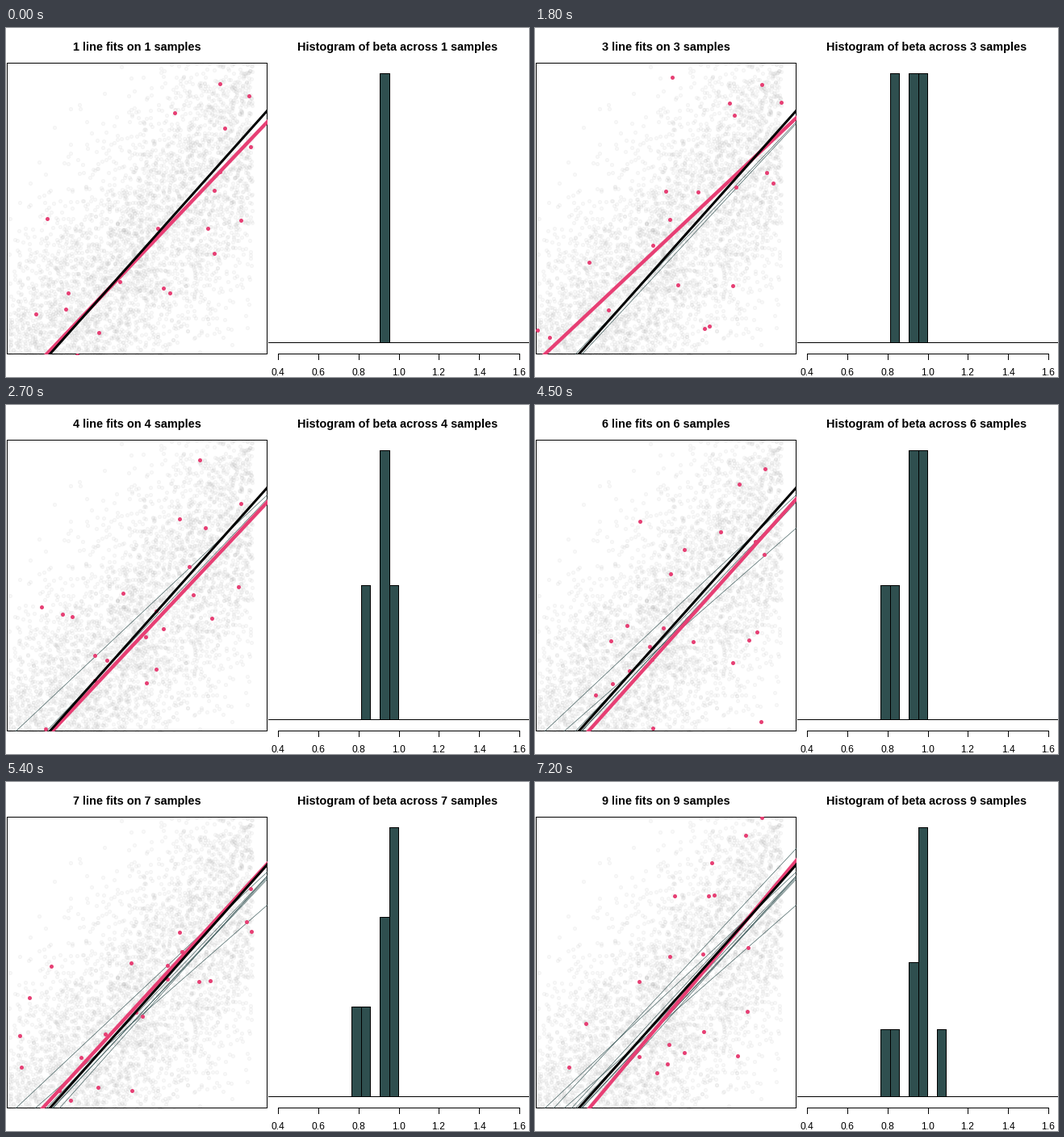
Recreate the animation shown at these times as a matplotlib script. Size 648 by 432 pixels, loop 8000 ms.

```python
import numpy as np
import matplotlib.pyplot as plt
from matplotlib.animation import FuncAnimation
from matplotlib.patches import Rectangle

W, H, DPI = 648, 432, 72
LEFT, RIGHT, TOP, BOTTOM = 1, 323, 43, 403
BASE, PEAK = 389, 56
AXIS_X, AXIS_MIN, UNIT = 337, 0.4, 249.2
BIN_START, BIN_WIDTH, BIN_COUNT = 0.766, 0.0466, 7
PINK, SLATE = "#E73F74", "#2F4F4F"
STEP, FRAMES, INTERVAL = 9, 80, 100

# Each fit: x where it meets the panel's bottom, y where it meets the right side
TRUE_FIT = (54, 102)
FITS = [(50, 116), (58, 118), (12, 111), (57, 120), (36, 152),
        (66, 116), (45, 101), (23, 82), (67, 97)]


def slope(fit):
    x0, y1 = fit
    return (BOTTOM - y1) / (RIGHT - x0)


def line_y(fit, x):
    return BOTTOM - (x - fit[0]) * slope(fit)


def beta_px(beta):
    return AXIS_X + UNIT * (beta - AXIS_MIN)


fig = plt.figure(figsize=(W / DPI, H / DPI), dpi=DPI, facecolor="white")
ax = fig.add_axes([0, 0, 1, 1])
ax.set_xlim(0, W)
ax.set_ylim(H, 0)
ax.axis("off")
panel = Rectangle((LEFT, TOP), RIGHT - LEFT + 1, BOTTOM - TOP + 1,
                  transform=ax.transData)


def stroke(xs, ys, z=2):
    ax.plot(xs, ys, color="black", lw=1, zorder=z, antialiased=False,
            solid_capstyle="butt")


def fit_line(fit, color, lw, z):
    xs = np.array([LEFT - 10, RIGHT + 10])
    line, = ax.plot(xs + 0.5, line_y(fit, xs) + 0.5, color=color, lw=lw, zorder=z)
    line.set_clip_path(panel)
    return line


def markers(xs, ys, **style):
    points, = ax.plot(xs, ys, "o", **style)
    points.set_clip_path(panel)
    return points


def label(x, y, text, size, weight="normal"):
    return ax.text(x, y, text, family="Liberation Sans", size=size,
                   weight=weight, ha="center", va="baseline")


# Population cloud, and one random sample of it for each fit
rng = np.random.default_rng(5)
cloud_x = rng.uniform(3, 305, 5000)
cloud_y = line_y(TRUE_FIT, cloud_x) + rng.normal(0, 88, cloud_x.size)
cloud = np.round(np.column_stack([cloud_x, cloud_y]))
samples = [rng.choice(cloud, 26, replace=False) for _ in FITS]

markers(*cloud.T, ms=4, mew=1, mfc=(0.745, 0.745, 0.745, 0.08),
        mec=(0.745, 0.745, 0.745, 0.15), zorder=1)
stroke([LEFT, RIGHT, RIGHT, LEFT, LEFT], [TOP, TOP, BOTTOM, BOTTOM, TOP])

thin = [fit_line(f, SLATE, 0.6, 3) for f in FITS]
dots = markers([], [], ms=5, mew=0, color=PINK, zorder=4)
thick = [fit_line(f, PINK, 4.4, 5) for f in FITS]
fit_line(TRUE_FIT, "black", 3, 6)

# Histogram axis
ticks = np.linspace(0.4, 1.6, 7)
stroke(np.round(beta_px(ticks[[0, -1]])), [BOTTOM, BOTTOM])
for tick in ticks:
    x = round(beta_px(tick))
    stroke([x, x], [BOTTOM, BOTTOM + 7])
    label(x, 430, f"{tick:.1f}", 12)
stroke([325, W], [BASE, BASE], z=4)

# Histogram bars
betas = np.array([slope(f) / slope(TRUE_FIT) for f in FITS])
bins = BIN_START + BIN_WIDTH * np.arange(BIN_COUNT + 1)
edges = np.round(beta_px(bins))
bars = [ax.add_patch(Rectangle((a, BASE), b - a, 0, fc=SLATE, ec="black", lw=1,
                               zorder=3, antialiased=False))
        for a, b in zip(edges, edges[1:])]

left_title = label(162, 28, "", 14.5, "bold")
right_title = label(485, 28, "", 14.5, "bold")


def update(frame):
    n = frame // STEP + 1
    left_title.set_text(f"{n} line fits on {n} samples")
    right_title.set_text(f"Histogram of beta across {n} samples")
    dots.set_data(*samples[n - 1].T)
    for i, (old, new) in enumerate(zip(thin, thick), start=1):
        old.set_visible(i < n)
        new.set_visible(i == n)
    counts, _ = np.histogram(betas[:n], bins)
    for bar, count in zip(bars, counts):
        bar.set_height(-round((BASE - PEAK) * count / counts.max()))
        bar.set_visible(bool(count))
    return []


anim = FuncAnimation(fig, update, frames=FRAMES, interval=INTERVAL,
                     init_func=lambda: update(0), repeat=True, repeat_delay=0)
plt.show()
```
